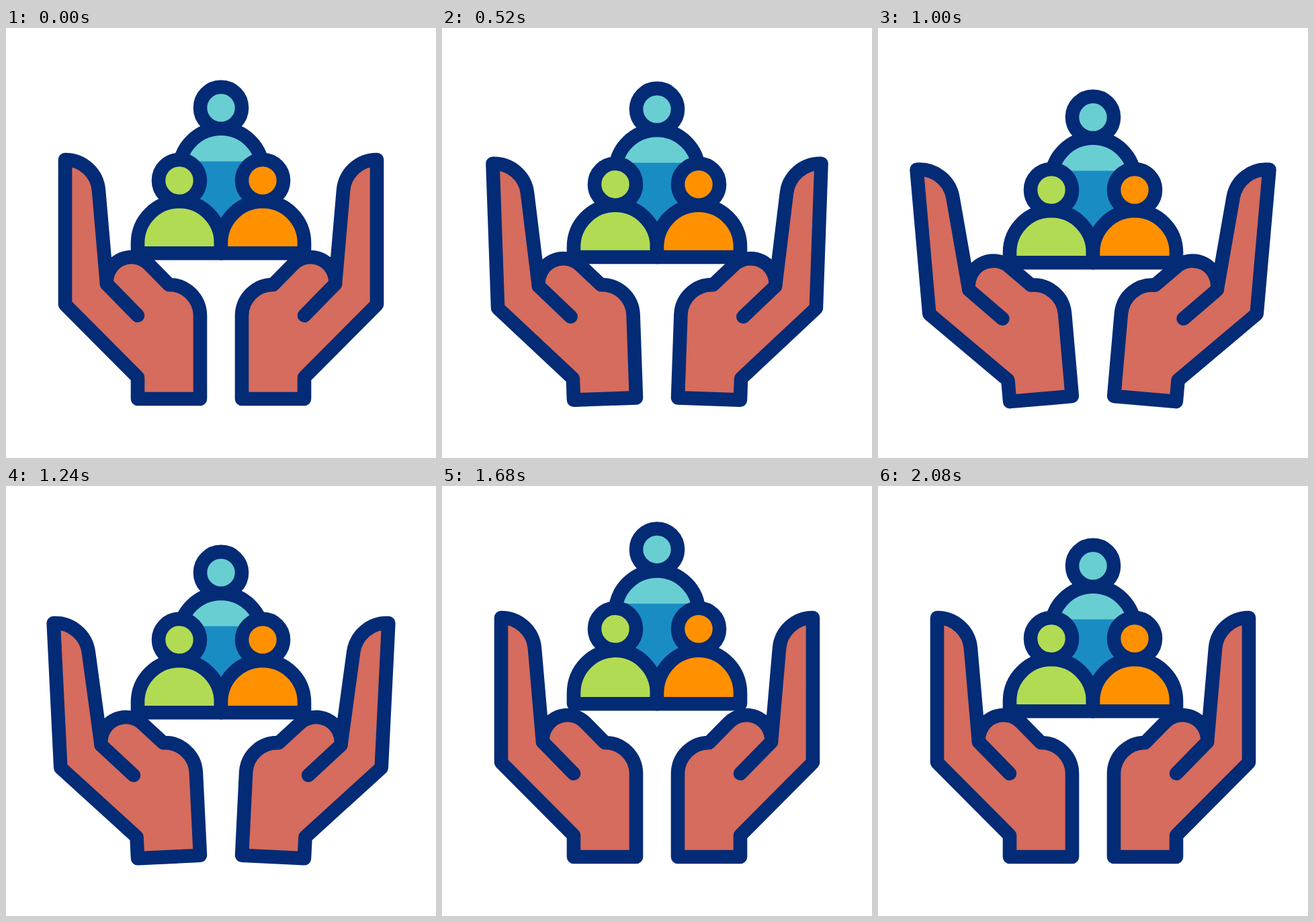
Animation, 640 px wide and 640 px high, one loop 2160 ms. Source, as an HTML page:

```html
<!DOCTYPE html>
<html lang="en">
<head>
<meta charset="utf-8">
<title>Hands holding a group</title>
<style>
  html, body { margin: 0; width: 100%; height: 100%; overflow: hidden; background: #fff; }
  svg { display: block; width: 100vw; height: 100vh; }
  .line { stroke: #032b76; stroke-width: 20.6; stroke-linecap: round; stroke-linejoin: round; }
</style>
</head>
<body>
<svg viewBox="0 0 640 640">
  <defs>
    <g id="hand" class="line" fill="#d56c5d">
      <path d="M88 196V411.5L196 520V552H289V428A46.5 46.5 0 0 0 242.500 382L213 352A37 37 0 0 0 149.700 378L150 381L138 242A50 50 0 0 0 88 196Z"/>
      <path d="M150 381L196 428" fill="none"/>
    </g>
  </defs>
  <g id="back">
    <path id="backFill" fill="#69ced2"/>
    <rect id="shade" x="258" width="124" fill="#1a8cc4"/>
    <path id="backLine" class="line" fill="none"/>
    <circle id="backHead" class="line" cx="320" r="31" fill="#69ced2"/>
  </g>
  <g class="line" fill="#b2db54">
    <path id="leftBody"/>
    <circle id="leftHead" cx="258" r="31"/>
  </g>
  <g class="line" fill="#ff9100">
    <path id="rightBody"/>
    <circle id="rightHead" cx="382" r="31"/>
  </g>
  <g id="leftHand"><use href="#hand"/></g>
  <g transform="translate(640 0) scale(-1 1)"><g id="rightHand"><use href="#hand"/></g></g>
</svg>
<script>
  const LOOP = 2160, STEP = 40;

  // Each track is a list of [time in ms, value].
  const tracks = {
    tilt: [[240, 0], [840, 5], [1024, 5], [1476, 0]],
    front: [[240, 0], [840, 14], [1024, 14], [1478, -14], [2020, 0]],
    back: [[320, 0], [920, 14], [1108, 14], [1570, -28], [1915, 0]],
    stretch: [[1200, 0], [1480, 1], [1840, 0]]
  };

  const el = id => document.getElementById(id);
  const set = (id, name, value) => el(id).setAttribute(name, value);
  const ease = u => u < 0.5 ? 4 * u ** 3 : 1 - 4 * (1 - u) ** 3;

  function valueAt(track, t) {
    if (t <= track[0][0]) return track[0][1];
    for (let i = 1; i < track.length; i++) {
      const [t0, a] = track[i - 1], [t1, b] = track[i];
      if (t < t1) return a + (b - a) * ease((t - t0) / (t1 - t0));
    }
    return track[track.length - 1][1];
  }

  function bodyPath(x, top, base, ry) {
    return `M${x - 62} ${base}V${top + ry}A62 ${ry} 0 0 1 ${x + 62} ${top + ry}V${base}Z`;
  }

  function draw(t) {
    const tilt = valueAt(tracks.tilt, t);
    const front = valueAt(tracks.front, t);
    const back = valueAt(tracks.back, t);
    const stretch = valueAt(tracks.stretch, t);

    for (const id of ["leftHand", "rightHand"]) set(id, "transform", `rotate(${-tilt} 243 552)`);

    for (const [side, x] of [["left", 258], ["right", 382]]) {
      set(side + "Body", "d", bodyPath(x, 258 + front - 6 * stretch, 335.3 + front, 62 + 5 * stretch));
      set(side + "Head", "cy", 227 + front - 9 * stretch);
    }

    const lag = back + 3 * stretch;
    const outline = bodyPath(320, 149.8 + lag, 325 + lag, 62);
    set("backFill", "d", outline);
    set("backLine", "d", outline);
    set("shade", "y", 198.5 + lag);
    set("shade", "height", 126.5);
    set("backHead", "cy", 118.8 + back);
  }

  const start = performance.now();
  function tick() {
    const t = (performance.now() - start) % LOOP;
    draw(Math.floor(t / STEP) * STEP);
    requestAnimationFrame(tick);
  }
  draw(0);
  requestAnimationFrame(tick);
</script>
</body>
</html>
```
